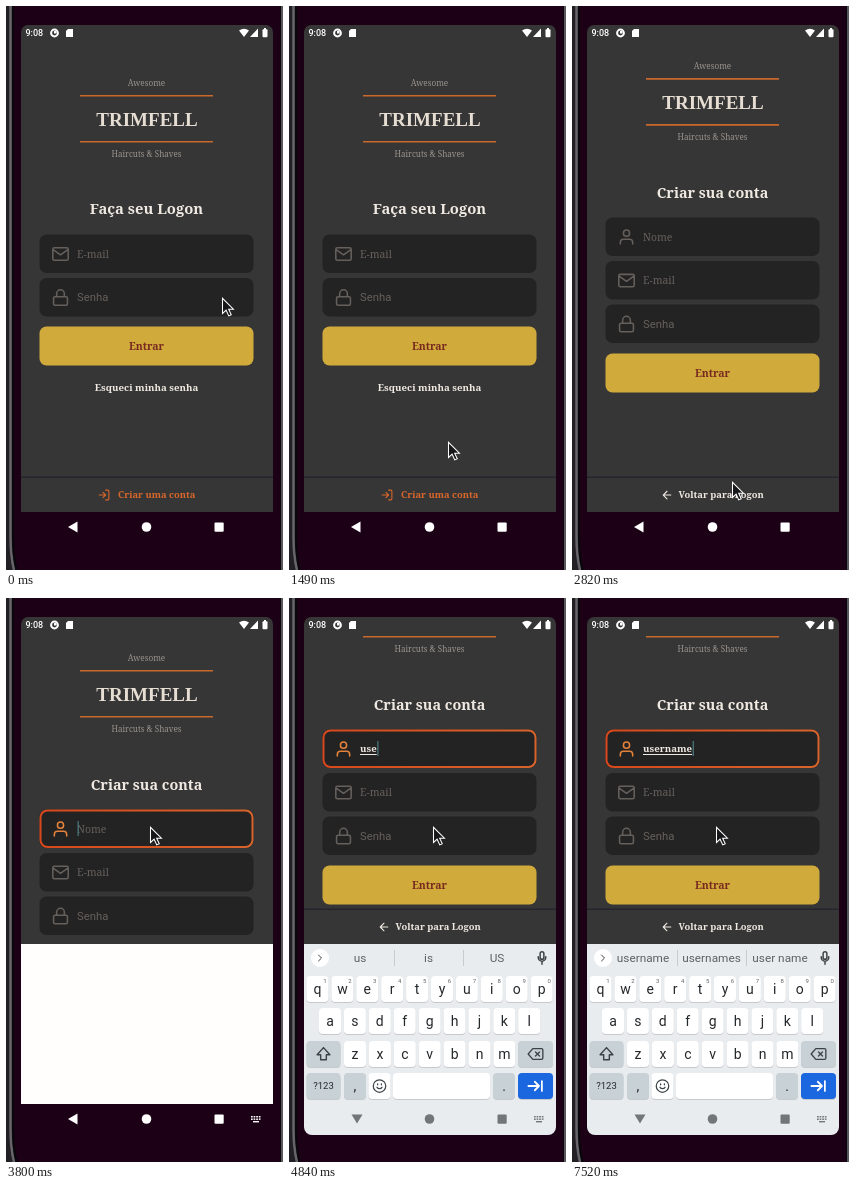
These frames come from a looping animation (277x564 px, 8000 ms). An HTML page with a canvas:

```html
<!DOCTYPE html>
<html lang="pt">
<head>
<meta charset="utf-8">
<title>Logon</title>
<style>
  html, body { margin: 0; height: 100%; overflow: hidden; background: #1b0016; }
  canvas { display: block; }
</style>
</head>
<body>
<canvas id="stage" width="277" height="564"></canvas>
<script>
const ctx = document.getElementById('stage').getContext('2d');
const LOOP = 8000;
const SLAB = '"Noto Serif", serif', SANS = 'Roboto, sans-serif';
const CREAM = '#f0e9e2', MUTED = '#66605d', ORANGE = '#c8692b', PAGE = '#363636', BEZEL = '#1b0016';
const TOP = 19, BOTTOM = 506, HEIGHT = BOTTOM - TOP;

const ICON = {
  mail: 'M4 4h16a2 2 0 0 1 2 2v12a2 2 0 0 1-2 2H4a2 2 0 0 1-2-2V6a2 2 0 0 1 2-2z M22 6l-10 7L2 6',
  lock: 'M5 11h14a2 2 0 0 1 2 2v7a2 2 0 0 1-2 2H5a2 2 0 0 1-2-2v-7a2 2 0 0 1 2-2z M7 11V7a5 5 0 0 1 10 0v4',
  user: 'M20 21v-2a4 4 0 0 0-4-4H8a4 4 0 0 0-4 4v2 M16 7a4 4 0 1 1-8 0a4 4 0 1 1 8 0',
  enter: 'M15 3h4a2 2 0 0 1 2 2v14a2 2 0 0 1-2 2h-4 M10 17l5-5-5-5 M15 12H3',
  back: 'M19 12H5 M12 19l-7-7 7-7',
  shift: 'M12 3l9 10h-5v7H8v-7H3z',
  erase: 'M21 4H8l-7 8 7 8h13a2 2 0 0 0 2-2V6a2 2 0 0 0-2-2z M18 9l-6 6 M12 9l6 6',
  smile: 'M22 12a10 10 0 1 1-20 0a10 10 0 1 1 20 0 M8 14s1.5 2 4 2 4-2 4-2 M9 8.5v1.5 M15 8.5v1.5',
  next: 'M2 12h15 M11 6l6 6-6 6 M21 5v14',
  chevron: 'M9 18l6-6-6-6',
  mic: 'M12 2a3 3 0 0 1 3 3v6a3 3 0 0 1-6 0V5a3 3 0 0 1 3-3z M18 10v1a6 6 0 0 1-12 0v-1 M12 17v5'
};

// Step values: [start time, value]
const TYPED = [[0, ''], [4720, 'u'], [4760, 'us'], [4840, 'use'], [5000, 'user'], [5760, 'usern'],
  [6180, 'user'], [7050, 'usern'], [7130, 'userna'], [7220, 'usernam'], [7300, 'username']];
const HINTS = [[0, ''], [4760, 'u,you,I'], [4800, 'us,is,US'], [5040, 'use,user,used'],
  [5210, 'user,users,username'], [5950, 'usern,username,user'], [6240, 'user,users,username'],
  [7180, 'usern,username,user'], [7340, 'usernam,username,user'], [7520, 'username,usernames,user name']];
const CARET = [[0, 0], [3670, 1], [4230, 0], [4720, 1], [5710, 0], [5760, 1], [6740, 0], [7050, 1]];
// Pointer tip: [time, x, y]
const POINTER = [[0, 216, 291], [360, 172, 430], [870, 172, 430], [1490, 159, 435], [1650, 157, 440],
  [2020, 139, 487], [2640, 139, 487], [2820, 160, 475], [3100, 168, 205], [3180, 162, 194], [3440, 144, 228]];

const stepAt = (steps, t) => steps.filter(s => s[0] <= t).pop()[1];
const clamp = v => Math.max(0, Math.min(1, v));

function rect(x, y, w, h, color, radius = 0) {
  ctx.fillStyle = color;
  ctx.beginPath();
  ctx.roundRect(x, y, w, h, radius);
  ctx.fill();
}
function text(str, x, y, size, color, { font = SLAB, weight = 400, align = 'center' } = {}) {
  ctx.font = `${weight} ${size}px ${font}`;
  ctx.textAlign = align;
  ctx.textBaseline = 'alphabetic';
  ctx.fillStyle = color;
  ctx.fillText(str, x, y + size * 0.35);
  return ctx.measureText(str).width;
}
function icon(name, cx, cy, size, color, width = 2) {
  ctx.save();
  ctx.translate(cx - size / 2, cy - size / 2);
  ctx.scale(size / 24, size / 24);
  ctx.lineWidth = width;
  ctx.lineCap = ctx.lineJoin = 'round';
  ctx.strokeStyle = color;
  ctx.stroke(new Path2D(ICON[name]));
  ctx.restore();
}
function fillPath(d, color) {
  ctx.fillStyle = color;
  ctx.fill(new Path2D(d));
}
function strokePath(d, color, width = 1) {
  ctx.strokeStyle = color;
  ctx.lineWidth = width;
  ctx.stroke(new Path2D(d));
}
// Draws inside the screen between two heights, shifted vertically.
function clipped(top, bottom, shift, paint) {
  ctx.save();
  ctx.beginPath();
  ctx.rect(15, top, 252, bottom - top);
  ctx.clip();
  ctx.translate(0, shift);
  paint();
  ctx.restore();
}

function logo(y) {
  text('Awesome', 140.5, y - 36, 8.2, '#99938e');
  rect(74, y - 24, 133, 1.6, ORANGE);
  text('TRIMFELL', 141, y, 19, '#e6ddd3', { font: '"Liberation Serif", serif', weight: 700 });
  rect(74, y + 22, 133, 1.6, ORANGE);
  text('Haircuts & Shaves', 140.5, y + 35, 8.1, '#99938e');
}
function field(y, name, label, { focused = false, typed = '', caret = 0 } = {}) {
  rect(33.5, y, 214, 38.5, '#232323', 7);
  if (focused) {
    const glow = ctx.createLinearGradient(34, 0, 247, 0);
    glow.addColorStop(0, '#d9481c');
    glow.addColorStop(1, '#d8642c');
    ctx.strokeStyle = glow;
    ctx.lineWidth = 2;
    ctx.beginPath();
    ctx.roundRect(34.5, y + 1, 212, 36.5, 7);
    ctx.stroke();
  }
  const mid = y + 19.5;
  icon(name, 54.5, mid, 18.5, focused ? '#e5823a' : MUTED);
  let width = 0;
  if (typed) {
    width = text(typed, 71, mid - 0.5, 9.7, CREAM, { align: 'left', weight: 700 });
    rect(71, mid + 5, width, 1, CREAM);
  } else {
    const secret = label === 'Senha';
    text(label, 71, mid, secret ? 11.3 : 10.4, MUTED, { align: 'left', font: secret ? SANS : SLAB });
  }
  if (caret) rect(71 + width + 0.5, mid - 8, 1.3, 15, '#47757a');
}
function button(y) {
  rect(33.5, y, 214, 39, '#d1aa3c', 7);
  text('Entrar', 140.5, y + 20, 10.5, '#782a20', { weight: 700 });
}
function footer(y, name, iconX, label, labelX, color) {
  rect(15, y, 252, 40, PAGE);
  rect(15, y, 252, 1.4, '#25252e');
  icon(name, iconX, y + 18.5, 13, color);
  text(label, labelX, y + 18.5, 9.4, color, { align: 'left', weight: 700 });
}

function logonPage() {
  rect(15, 0, 252, 560, PAGE);
  logo(113);
  text('Faça seu Logon', 140.5, 203, 14.8, CREAM, { weight: 700 });
  field(228.5, 'mail', 'E-mail');
  field(272, 'lock', 'Senha');
  button(320.5);
  text('Esqueci minha senha', 140.5, 382, 9.7, CREAM, { weight: 700 });
  footer(470.5, 'enter', 98, 'Criar uma conta', 112, '#d8672b');
}
function signupPage(t, scroll) {
  rect(15, -60, 252, 640, PAGE);
  logo(96);
  text('Criar sua conta', 140.5, 186.5, 14.4, CREAM, { weight: 700 });
  field(211.5, 'user', 'Nome', { focused: t >= 3670, typed: stepAt(TYPED, t), caret: stepAt(CARET, t) });
  field(255, 'mail', 'E-mail');
  field(298.5, 'lock', 'Senha');
  button(347.5);
  footer(470.5 - scroll, 'back', 95, 'Voltar para Logon', 106.5, CREAM);
}
// The second page is uncovered from below while both pages drift upwards.
function pages(t, scroll) {
  const reveal = 1 - (1 - clamp((t - 2506) / 425)) ** 4.6;
  const edge = BOTTOM - HEIGHT * reveal;
  if (reveal < 1) {
    clipped(TOP, edge, -0.02 * HEIGHT * reveal, logonPage);
    rect(15, TOP, 252, edge - TOP, `rgba(9, 9, 64, ${0.2 * clamp(reveal / 0.36)})`);
  }
  if (reveal > 0) {
    clipped(edge, BOTTOM, 0.041 * HEIGHT * (1 - reveal) - scroll, () => signupPage(t, scroll));
  }
}

function key(cx, y, label, width = 22, color = '#fff') {
  rect(cx - width / 2, y + 1, width, 26, '#c6c9cd', 4);
  rect(cx - width / 2, y, width, 26, color, 4);
  text(label, cx, y + 13, label.length > 1 ? 9.5 : 14, '#25282b', { font: SANS });
}
function keyboard(t) {
  const GREY = '#c8d1d5', INK = '#3c4347';
  rect(15, 346, 252, 191, '#e9ecef', [0, 0, 8, 8]);
  rect(22, 351, 18, 18, '#fff', 9);
  icon('chevron', 31, 360, 12, INK);
  icon('mic', 253, 360, 15, INK, 2.4);
  const hints = stepAt(HINTS, t);
  if (hints) {
    hints.split(',').forEach((h, i) => text(h, 71 + i * 68.5, 360, 11.8, '#5c6166', { font: SANS }));
    rect(105, 352, 1, 16, '#c8cccf');
    rect(174, 352, 1, 16, '#c8cccf');
  }
  [...'qwertyuiop'].forEach((c, i) => {
    key(28.5 + i * 24.9, 378, c);
    text((i + 1) % 10, 36 + i * 24.9, 383, 6, '#5c6166', { font: SANS });
  });
  [...'asdfghjkl'].forEach((c, i) => key(41 + i * 24.9, 410, c));
  [...'zxcvbnm'].forEach((c, i) => key(66 + i * 24.9, 443, c));
  key(34.5, 443, '', 34, GREY);
  icon('shift', 34.5, 456, 17, INK);
  key(246.5, 443, '', 35, GREY);
  icon('erase', 246.5, 456, 16, INK);
  key(34.5, 475, '?123', 34, GREY);
  key(66, 475, ',', 22, GREY);
  key(90.5, 475, '', 22);
  icon('smile', 90.5, 488, 15, INK);
  key(152.5, 475, '', 97);
  key(215, 475, '.', 22, GREY);
  key(246.5, 475, '', 35, '#1b67df');
  icon('next', 246.5, 488, 17, '#fff', 2.5);
}

function statusBar() {
  rect(15, TOP, 252, 16, BEZEL);
  rect(15, TOP, 252, 16, PAGE, [7, 7, 0, 0]);
  text('9:08', 19.5, 27, 9, '#fff', { font: SANS, weight: 500, align: 'left' });
  ctx.strokeStyle = '#fff';
  ctx.lineWidth = 2;
  ctx.beginPath();
  ctx.arc(48.5, 27, 3.4, 0, 7);
  ctx.stroke();
  rect(48, 25, 2.5, 2.5, '#fff');
  fillPath('M62 23h5v8h-7v-6z', '#fff');
  fillPath('M233 24.5q5-3.5 10 0l-5 6.5z M252 22.5v8.5h-8z', '#fff');
  rect(256.5, 23.2, 5, 8, '#fff', 1);
  rect(258, 22, 2, 2, '#fff');
}
function navBar(light, hasKeyboard) {
  const color = light ? '#727579' : '#fff';
  fillPath(light ? 'M62.5 516.5h11l-5.5 9z' : 'M62 521l9.5-5.5v11z', color);
  ctx.beginPath();
  ctx.arc(140.5, 521, 4.8, 0, 7);
  ctx.fill();
  rect(208.5, 516.5, 9.2, 9.2, color, 1);
  if (!hasKeyboard) return;
  for (let i = 0; i < 8; i++) rect(245 + (i % 4) * 2.6, 518 + (i >> 2) * 2.4, 1.7, 1.5, color);
  rect(247, 523, 6, 1.4, color);
}
function phone() {
  rect(0, 0, 277, 564, BEZEL);
  fillPath('M0 0H7V530Q7 550 10 564H0z', '#222024');
  strokePath('M4.5 0V530Q4.5 550 8 564', '#67646a', 2.5);
  strokePath('M7 0V530Q7 550 10.5 564', '#09070b', 2);
  rect(274, 0, 1, 564, '#0a080c');
  rect(275, 0, 2, 564, '#5a565e');
}
function pointer(t) {
  const i = POINTER.findIndex(p => p[0] > t);
  let [, x, y] = POINTER[POINTER.length - 1];
  if (i > 0) {
    const [t0, x0, y0] = POINTER[i - 1], [t1, x1, y1] = POINTER[i];
    const p = (t - t0) / (t1 - t0), e = p * p * (3 - 2 * p);
    x = x0 + (x1 - x0) * e;
    y = y0 + (y1 - y0) * e;
  }
  ctx.save();
  ctx.translate(x + 0.5, y + 1.3);
  ctx.scale(0.95, 0.95);
  const arrow = 'M0 0V16L3.8 12.5L6.6 18.5L9.2 17.3L6.5 11.5H11.5z';
  fillPath(arrow, '#17171a');
  strokePath(arrow, '#fff', 1.1);
  ctx.restore();
}

function draw(t) {
  const keys = t >= 3880, panel = t >= 3760;
  phone();
  pages(t, t >= 3960 ? 80 : 0);
  statusBar();
  if (keys) keyboard(t);
  else if (panel) rect(15, 346, 252, BOTTOM - 346, '#fffefd');
  navBar(keys, panel);
  pointer(t);
}

function tick() {
  draw(performance.now() % LOOP);
  requestAnimationFrame(tick);
}
tick();
</script>
</body>
</html>
```
